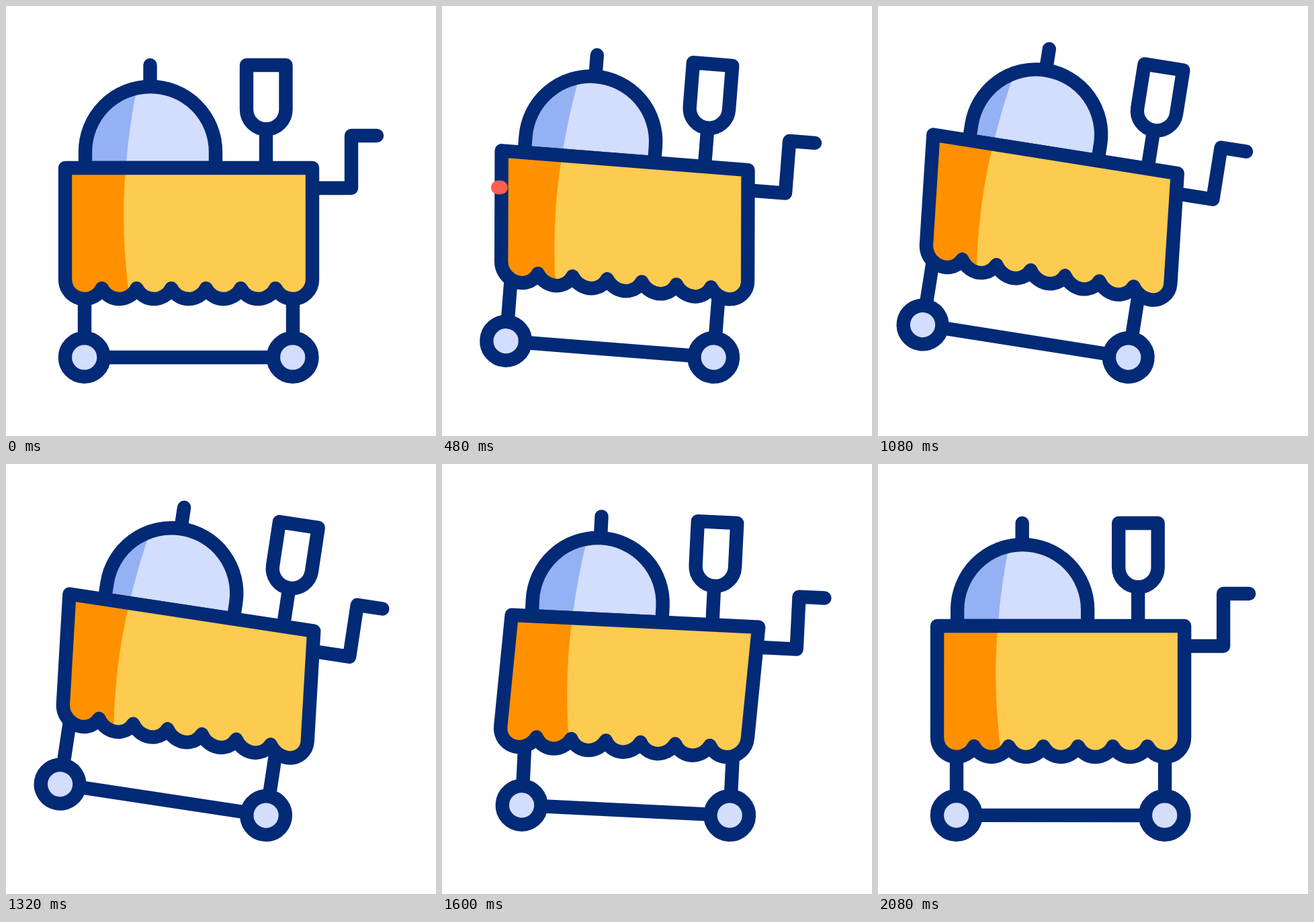
Write an HTML page with a canvas that moves like this. It is 640 by 640 pixels and loops after 2320 ms.

```html
<!DOCTYPE html>
<html lang="en">
<head>
<meta charset="utf-8">
<title>Serving cart</title>
<style>
html, body { margin: 0; width: 100%; height: 100%; overflow: hidden; background: #fff; }
canvas { display: block; width: 100vmin; height: 100vmin; }
</style>
</head>
<body>
<canvas id="stage" width="640" height="640"></canvas>
<script>
const ctx = document.getElementById("stage").getContext("2d");
const LOOP = 2320, STEP = 40;
const NAVY = "#032a76", ORANGE = "#ff9100", YELLOW = "#fdcb50";
const PALE = "#d3ddfd", BLUE = "#94b1f3", RED = "#ff6050";
const PIVOT = { x: 426.5, y: 523 };

// Eased 0..1 between two times
function ramp(t, from, to) {
  const u = Math.min(1, Math.max(0, (t - from) / (to - from)));
  return u * u * (3 - 2 * u);
}

// 1 until the start, then a soft fall towards 0
function settle(t, from, span) {
  return Math.exp(-Math.pow(Math.max(0, t - from) / span, 1.88));
}

// The cart rolls back and tips up, then returns a little too far
const shift = t => -54 * ramp(t, 240, 780) + 55.5 * ramp(t, 1190, 1580) - 1.5 * ramp(t, 1680, 2000);
const tilt = t => 9 * ramp(t, 230, 730) * settle(t, 1260, 313) * Math.PI / 180;
// The cloth trails behind and swings out
const sway = t => 15.6 * ramp(t, 200, 590) - 23.9 * ramp(t, 1300, 1600)
  + 15.6 * ramp(t, 1600, 1840) - 7.3 * ramp(t, 1840, 2080);
// Dome and glass slide along the table top
const slide = t => 24 * (ramp(t, 260, 1100) - ramp(t, 1280, 1600));

function line(...p) {
  ctx.beginPath();
  for (let i = 0; i < p.length; i += 2) ctx.lineTo(p[i], p[i + 1]);
  ctx.stroke();
}

function wheel(x) {
  ctx.beginPath();
  ctx.arc(x, 523, 28.8, 0, Math.PI * 2);
  ctx.fillStyle = PALE;
  ctx.fill();
  ctx.stroke();
}

function moved(shape, matrix) {
  const p = new Path2D();
  p.addPath(shape, matrix);
  return p;
}

// Fills a shape, shades its left part up to a curve, then outlines it
function shaded(shape, base, shade, edge) {
  ctx.fillStyle = base;
  ctx.fill(shape);
  ctx.save();
  ctx.clip(shape);
  ctx.fillStyle = shade;
  ctx.fill(edge);
  ctx.restore();
  ctx.stroke(shape);
}

function clothPath() {
  const p = new Path2D(), r = 29, gap = 51.67;
  const cut = Math.acos(gap / 2 / r);
  p.moveTo(88, 241);
  p.lineTo(456, 241);
  for (let i = 6; i >= 0; i--) {
    p.arc(117 + i * gap, 407, r, i === 6 ? 0 : cut, i === 0 ? Math.PI : Math.PI - cut);
  }
  p.closePath();
  return p;
}

const cloth = clothPath();
const clothEdge = new Path2D("M60 235H179Q169 330 185 445H60Z");
const dome = new Path2D("M118 241V217A97 97 0 0 1 312 217V241Z");
const domeEdge = new Path2D("M80 100H200Q184 165 178 245H80Z");
const glass = new Path2D("M358 88H416.5V154A29.2 29.2 0 0 1 358 154Z");

function cart(t) {
  const angle = tilt(t), along = slide(t), lean = sway(t) / 166;
  ctx.save();
  ctx.translate(PIVOT.x + shift(t), PIVOT.y);
  ctx.rotate(angle);
  ctx.translate(-PIVOT.x, -PIVOT.y);
  ctx.strokeStyle = NAVY;

  const slid = { e: along };
  line(214.5 + along, 88, 214.5 + along, 115);
  shaded(moved(dome, slid), PALE, BLUE, domeEdge);
  line(387 + along, 187, 387 + along, 241);
  ctx.stroke(moved(glass, slid));
  line(456, 271, 514, 271, 514, 193, 552, 193);

  line(117, 426, 117, 490);
  line(427, 426, 427, 490);
  line(146, 523, 398, 523);
  wheel(116.7);
  wheel(426.7);

  // The hem moves level with the ground while the top edge stays put
  const dx = lean * Math.cos(angle), dy = -lean * Math.sin(angle);
  const leaning = { a: 1, b: 0, c: dx, d: 1 + dy, e: -241 * dx, f: -241 * dy };
  shaded(moved(cloth, leaning), YELLOW, ORANGE, clothEdge);
  ctx.restore();
}

function streak(t, start, x, y, length) {
  const time = 280, lag = 110;
  const head = ramp(t, start, start + time);
  const tail = ramp(t, start + lag, start + lag + time);
  if (head - tail < 0.002) return;
  ctx.strokeStyle = RED;
  line(x + tail * length, y, x + head * length, y);
}

function draw(now) {
  const loop = now % LOOP, t = loop - loop % STEP;
  ctx.fillStyle = "#fff";
  ctx.fillRect(0, 0, 640, 640);
  ctx.lineWidth = 20.4;
  ctx.lineCap = ctx.lineJoin = "round";
  cart(t);
  streak(t, 460, 83, 270, 323);
  streak(t, 632, 128, 424.5, 170);
  requestAnimationFrame(draw);
}
requestAnimationFrame(draw);
</script>
</body>
</html>
```
